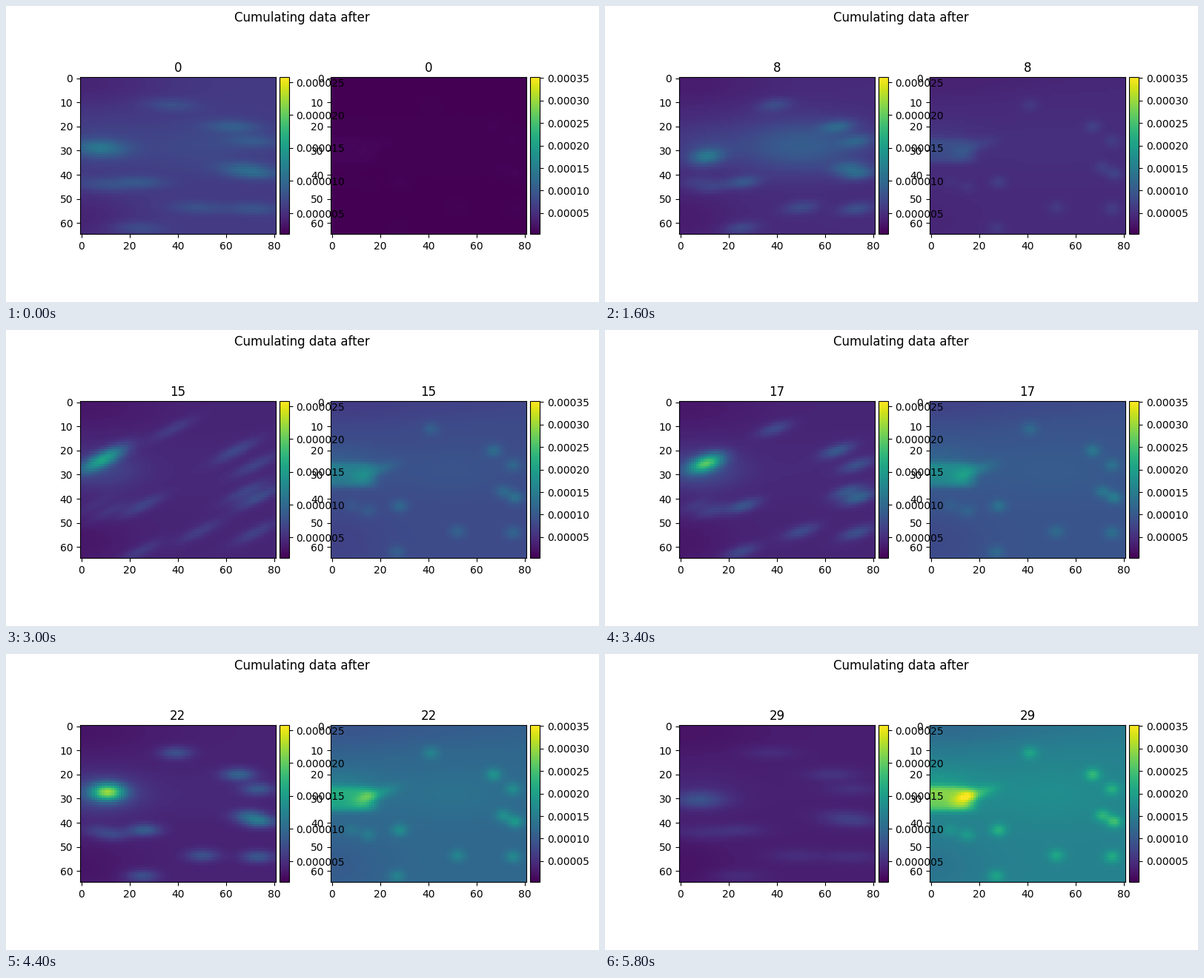
These frames come from a looping animation (800 by 400 pixels, 6000 ms). A matplotlib script:

```python
import matplotlib.pyplot as plt
import numpy as np
from matplotlib.animation import FuncAnimation
from mpl_toolkits.axes_grid1 import make_axes_locatable

FRAMES = 30
ROWS, COLS = 65, 81
STEP_LIM = (1.895e-6, 25.79e-6)
SUM_LIM = (4e-6, 352e-6)
Y, X = np.mgrid[0:ROWS, 0:COLS].astype(float)

# Places that keep collecting: x, y, strength
SITES = [
    (41, 11, 0.4), (67, 20, 0.55), (75, 26, 0.45), (71, 37, 0.5),
    (76, 39.5, 0.65), (28, 43, 0.5), (15, 45, 0.3), (8, 43, 0.2),
    (52, 53.5, 0.4), (75, 54, 0.45), (27, 62, 0.4),
]

# Weather at a few moments: each quantity runs linearly between them.
TIMES = [0, 4, 8, 15, 20, 25, 29]
WEATHER = {
    "level": [0.17, 0.18, 0.125, 0.105, 0.105, 0.08, 0.085],
    "gain": [0.2, 0.2, 0.27, 0.2, 0.48, 0.26, 0.12],
    "peak": [0.18, 0.2, 0.22, 0.4, 0.72, 0.45, 0.14],
    "peak_y": [29, 31, 32.5, 23.5, 27.7, 26.5, 30.5],
    "stretch": [8, 9, 4, 6, 1, 8, 8],
    "slope": [0.03, 0.03, -0.1, -0.45, 0, 0, 0],
    "cloud": [0.05, 0.05, 0.17, 0.01, 0.015, 0.03, 0.005],
}


def blob(x, y, rx, ry, slope=0, p=2):
    """Soft bump, sheared by slope; a high p gives it square edges."""
    u = np.abs(X - x) / rx
    v = np.abs(Y - y - slope * (X - x)) / ry
    return np.exp(-u**p - v**p)


shade = blob(0, 2, 35, 10) + blob(0, 58, 22, 12)
halo = blob(8, 28, 17, 8)
cloud = blob(50, 28, 28, 11)

total = (
    0.44 - 0.06 * shade - 0.05 * blob(40, 0, 60, 7)
    + 0.26 * blob(4, 30, 14, 5.5, p=6) + 0.12 * blob(2, 26, 18, 8)
    + 0.15 * blob(13, 31, 5, 3) + 0.17 * blob(20, 27.5, 7, 2.5, -0.25)
    + 0.05 * cloud
    + sum(0.38 * s * blob(x, y, 3.3, 2.6) for x, y, s in SITES)
)
late_peak = 0.14 * blob(15.5, 28.7, 3.5, 2)


def step_data(k):
    w = {name: np.interp(k, TIMES, vals) for name, vals in WEATHER.items()}
    stretch, slope = w["stretch"], w["slope"]
    field = w["level"] * (1 - 0.4 * shade) + w["cloud"] * cloud
    field += w["peak"] * (
        blob(14 - 0.8 * stretch, w["peak_y"], 3 + stretch, 3.5, slope)
        + 0.25 * halo
    )
    for x, y, s in SITES:
        field += w["gain"] * s * blob(x - stretch / 2, y, 3 + stretch, 2.6, slope)
    lo, hi = STEP_LIM
    return lo + (hi - lo) * field


def sum_data(k):
    lo, hi = SUM_LIM
    ramp = np.clip((k - 15) / 8, 0, 1)
    return (lo + (hi - lo) * (total + ramp * late_peak)) * (k + 1) / FRAMES


def add_bar(im, ticks, fmt):
    cax = make_axes_locatable(im.axes).append_axes("right", size="5%", pad=0.05)
    fig.colorbar(im, cax=cax, ticks=ticks, format=fmt)


fig, axes = plt.subplots(1, 2, figsize=(8, 4), dpi=100)
fig.suptitle("Cumulating data after", x=0.499, y=0.983)
sources = (step_data, sum_data)
images = [
    ax.imshow(data(0), cmap="viridis", vmin=lim[0], vmax=lim[1])
    for ax, data, lim in zip(axes, sources, (STEP_LIM, SUM_LIM))
]
for ax in axes:
    ax.set_xticks(range(0, 81, 20))
    ax.set_yticks(range(0, 61, 10))
add_bar(images[0], np.arange(1, 6) * 5e-6, "%.6f")
add_bar(images[1], np.arange(1, 8) * 5e-5, "%.5f")


def update(k):
    for ax, im, data in zip(axes, images, sources):
        im.set_data(data(k))
        ax.set_title(str(k), pad=5.3)
    return images


anim = FuncAnimation(fig, update, frames=FRAMES, interval=200, repeat=True, repeat_delay=0)
plt.show()
```
